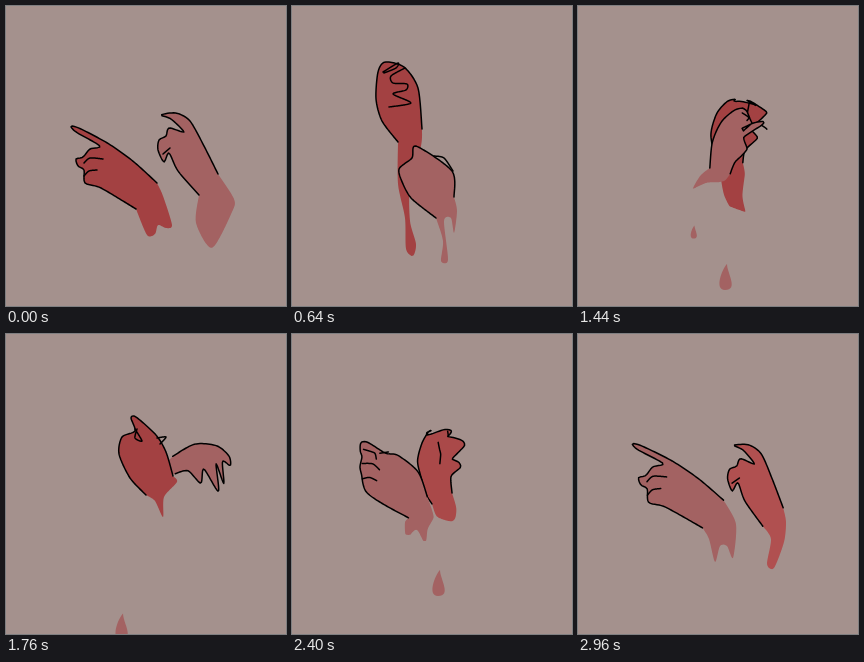
An HTML page with a canvas that plays this animation: 280x300 px, repeating every 3.04 s.

```html
<!DOCTYPE html>
<html lang="en">
<head>
<meta charset="utf-8">
<title>Two hands</title>
<style>
html, body { margin: 0; width: 100%; height: 100%; overflow: hidden; background: #a4918d; }
canvas { display: block; }
</style>
</head>
<body>
<canvas id="stage" width="280" height="300"></canvas>
<script>
const ctx = document.getElementById('stage').getContext('2d');
const LOOP = 3040, STEP = 80, N = 120;
const RED = [163, 65, 66], LIGHT = [176, 80, 80], ROSE = [163, 98, 98];

const mix = (a, b, u) => a + (b - a) * u;
const blend = (p, q, u) => p.map((a, i) => [mix(a[0], q[i][0], u), mix(a[1], q[i][1], u)]);
const rgb = c => `rgb(${c.map(Math.round)})`;
const points = s => s.split(' ').map(p => p.split(',').map(Number));

// Value between a and b with end slopes m and n.
function hermite(a, b, m, n, u) {
  const c2 = 3 * (b - a) - 2 * m - n, c3 = 2 * (a - b) + m + n;
  return a + u * (m + u * (c2 + u * c3));
}

// Smooth open curve through the points, as N evenly spaced ones.
function curve(p) {
  const at = i => p[Math.max(0, Math.min(p.length - 1, i))];
  const dense = [];
  for (let i = 0; i < p.length - 1; i++) {
    const [a, b, c, d] = [at(i - 1), at(i), at(i + 1), at(i + 2)];
    for (let u = 0; u < 1; u += 0.125) {
      dense.push([0, 1].map(k => hermite(b[k], c[k], 0.4 * (c[k] - a[k]), 0.4 * (d[k] - b[k]), u)));
    }
  }
  dense.push(p[p.length - 1]);
  const len = [0];
  for (let i = 1; i < dense.length; i++) {
    const [a, b] = [dense[i - 1], dense[i]];
    len.push(len[i - 1] + Math.hypot(b[0] - a[0], b[1] - a[1]));
  }
  const total = len[len.length - 1];
  let j = 1;
  return Array.from({ length: N }, (_, i) => {
    const s = total * i / (N - 1);
    while (j < len.length - 1 && len[j] < s) j++;
    const u = (s - len[j - 1]) / (len[j] - len[j - 1] || 1);
    return [0, 1].map(k => mix(dense[j - 1][k], dense[j][k], u));
  });
}

// A hand shape: contour from wrist round the fingers to the wrist, then creases.
const shape = (...lines) => lines.map(points);

function wristOf([contour]) {
  const a = contour[0], b = contour[contour.length - 1];
  return [(a[0] + b[0]) / 2, (a[1] + b[1]) / 2];
}

// Moves a shape's wrist to (x, y), turned and scaled.
function place(lines, x, y, turn, scale) {
  const [wx, wy] = wristOf(lines);
  const c = Math.cos(turn) * scale, s = Math.sin(turn) * scale;
  return lines.map(l => l.map(([px, py]) =>
    [x + (px - wx) * c - (py - wy) * s, y + (px - wx) * s + (py - wy) * c]));
}

// A key pose in its own frame; the tail is the dripping edge below the wrist.
function key(time, color, lines, tail) {
  const [contour] = lines, [wx, wy] = wristOf(lines);
  const x = contour.reduce((sum, p) => sum + p[0], 0) / contour.length;
  const y = contour.reduce((sum, p) => sum + p[1], 0) / contour.length;
  const angle = Math.atan2(y - wy, x - wx), c = Math.cos(angle), s = Math.sin(angle);
  const local = l => curve(l).map(([px, py]) =>
    [(px - x) * c + (py - y) * s, (py - y) * c - (px - x) * s]);
  const edge = [contour[contour.length - 1], ...points(tail), contour[0]];
  return { time, color, x, y, angle, lines: lines.map(local), tail: local(edge) };
}

const pointing = shape(
  '151,177 128,156 103,138 75,123 65,120 70,126 94,140 84,143 77,151 70,153 72,160 78,164 79,177 95,182 130,203',
  '78,157 84,152 97,153', '78,170 83,165 91,164');
const hooked = shape(
  '212,168 198,140 184,115 170,107 155,109 165,113 178,126 163,122 160,130 153,134 152,144 158,156 163,147 172,165 193,189',
  '157,148 164,142');
const wing = shape(
  '152,139 163,127 185,131 178,114 209,127 187,100 209,115 192,93 203,92 195,83 175,81 151,95 137,123');
const curled = shape('130,123 126,82 112,61 93,56 86,66 84,93 90,115 106,136',
  '113,62 99,70 101,77 115,78 114,84 101,88 119,97 97,101', '91,66 106,57 104,62 92,67');
const bent = shape('167,142 160,118 150,101 130,83 125,84 129,97 116,103 113,120 124,144 140,161',
  '129,95 136,107 129,104 131,95', '151,104 160,103 154,110');
const claw = shape(
  '138,127 142,106 160,106 158,99 143,95 167,93 165,86 143,79 170,74 164,68 141,67 160,54 155,50 138,55 121,71 119,95 118,129',
  '140,128 146,95 152,72');
const knuckles = shape('181,186 172,140 169,127 161,122 155,128 150,132 142,135 135,140 128,147 139,168 155,201 165,206',
  '133,143 140,142 146,152', '151,132 156,140');
const fist = shape('162,191 160,165 124,140 120,152 107,163 111,178 120,193 144,212',
  '142,150 152,152 161,165');
const pinch = shape('153,163 142,146 122,129 106,106 101,104 104,116 118,133 101,123 90,112 85,114 88,130 104,154 137,182',
  '95,121 102,117 104,123 96,124');
const grip = shape('154,182 141,162 120,145 108,149 90,139 83,146 83,173 97,190 137,208',
  '84,141 94,153', '84,153 92,163', '84,168 90,177', '105,146 122,142');
const folded = shape('127,143 123,115 103,98 68,75 66,84 70,90 66,100 68,109 66,127 83,143 107,159',
  '70,90 86,90 86,98', '67,106 84,102 94,110', '67,122 79,115 91,118');

const red = [
  key(0, RED, pointing, '141,229 149,228 152,219 160,222 166,219 157,190'),
  key(640, RED, curled, '106,178 113,212 114,243 121,250 124,238 118,215 118,180 129,140'),
  key(1120, RED, wing, '116,172 119,222 126,190'),
  key(1760, RED, bent, '149,167 157,183 158,163 171,148'),
  key(2160, RED, claw, '109,150 125,165 137,150'),
  key(2640, LIGHT, knuckles, '182,203 187,200'),
  key(2960, LIGHT, place(hooked, 195, 183, 0.1, 0.97), '193,205 189,230 196,234 206,208 208,188')
];
const rose = [
  key(0, ROSE, hooked, '190,217 206,242 226,206 228,193'),
  key(640, ROSE, fist, '151,235 149,255 156,254 152,215 159,212 162,227 165,205'),
  key(1120, ROSE, pinch, '138,205 150,232 147,205 158,178'),
  key(1760, ROSE, place(wing, 168, 131, 0.6, 0.8), '161,130 163,141'),
  key(2160, ROSE, grip, '130,208 131,219 136,211 144,211 149,220 152,205 165,198'),
  key(2640, ROSE, folded, '106,182 111,189 116,181 127,198 128,165'),
  key(2960, ROSE, place(pointing, 135, 180, -0.03, 1.04), '131,205 137,228 142,212 149,212 155,224 158,190')
];

// Falling drops: start time, x, y, colour.
const drops = [
  [160, 147, 235, RED], [640, 119, 250, RED], [880, 150, 244, ROSE],
  [1120, 148, 230, ROSE], [1340, 116, 222, ROSE], [2150, 147, 224, ROSE]
];

function trace(p) {
  ctx.beginPath();
  p.forEach(([x, y]) => ctx.lineTo(x, y));
}

// Position along a hand's smooth path between keys i and i + 1.
function glide(hand, i, u, axis) {
  const a = hand[i], b = hand[i + 1], span = b.time - a.time;
  const slope = j => {
    const p = hand[Math.max(0, j - 1)], q = hand[Math.min(hand.length - 1, j + 1)];
    return (q[axis] - p[axis]) / (q.time - p.time) * span;
  };
  return hermite(a[axis], b[axis], slope(i), slope(i + 1), u);
}

function drawHand(hand, t) {
  let i = 0;
  while (i < hand.length - 2 && hand[i + 1].time <= t) i++;
  const a = hand[i], b = hand[i + 1], u = (t - a.time) / (b.time - a.time);
  const turn = Math.atan2(Math.sin(b.angle - a.angle), Math.cos(b.angle - a.angle));
  ctx.save();
  ctx.translate(glide(hand, i, u, 'x'), glide(hand, i, u, 'y'));
  ctx.rotate(a.angle + turn * u);
  ctx.fillStyle = rgb(a.color.map((v, k) => mix(v, b.color[k], u)));
  trace([...blend(a.lines[0], b.lines[0], u), ...blend(a.tail, b.tail, u)]);
  ctx.fill();
  for (let k = 0; k < Math.max(a.lines.length, b.lines.length); k++) {
    const p = a.lines[k], q = b.lines[k];
    // A crease that only one pose has grows or shrinks along its length.
    trace(p && q ? blend(p, q, u) : (p || q).slice(0, Math.round(N * (p ? 1 - u : u))));
    ctx.stroke();
  }
  ctx.restore();
}

function drawDrop([start, x, y, color], t) {
  const age = t - start, size = Math.min(1, age / 200);
  if (age <= 0) return;
  ctx.save();
  ctx.translate(x, y + 0.0004 * age * age);
  ctx.scale(size, size);
  ctx.fillStyle = rgb(color);
  ctx.beginPath();
  ctx.moveTo(1, -13);
  ctx.bezierCurveTo(1, -4, 13, 13, -1, 13);
  ctx.bezierCurveTo(-12, 13, -4, -8, 1, -13);
  ctx.fill();
  ctx.restore();
}

function draw(now) {
  const t = Math.floor((now % LOOP) / STEP) * STEP;
  ctx.fillStyle = '#a4918d';
  ctx.fillRect(0, 0, 280, 300);
  ctx.strokeStyle = '#000';
  ctx.lineWidth = 1.5;
  ctx.lineCap = ctx.lineJoin = 'round';
  drops.forEach(d => drawDrop(d, t));
  const order = t > 1440 && t < 2000 ? [rose, red] : [red, rose];
  order.forEach(hand => drawHand(hand, t));
}

const begin = performance.now();
function tick() {
  draw(Math.max(0, performance.now() - begin));
  requestAnimationFrame(tick);
}
tick();
</script>
</body>
</html>
```
